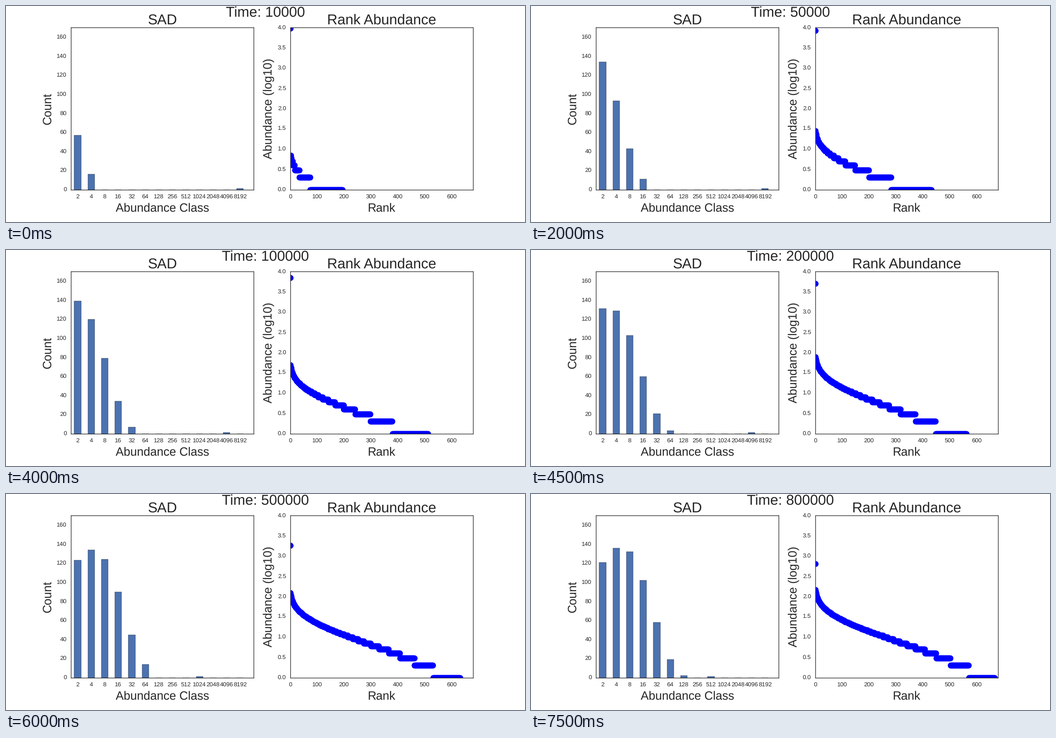
Animation of 1159 by 483 pixels, one loop 8000 ms. Source, as a matplotlib script:

```python
import numpy as np
import matplotlib.pyplot as plt
from matplotlib.animation import FuncAnimation

W, H, DPI = 1159, 483, 96
INK = "#262626"
plt.rcParams["font.family"] = "Liberation Sans"
plt.rcParams["text.hinting"] = "none"

# Time in units of 10000 steps
TIMES = [1, 2, 3, 4, 5, 6, 7, 9, *range(10, 81, 10)]
CLASSES = 2 ** np.arange(1, 14)

KEY_TIMES = [1, 3, 10, 30, 80]
RICHNESS = [195, 372, 513, 593, 668]
STEEPNESS = [1.87, 1.07, 0.58, 0.375, 0.303]
SHAPE = 0.6


def over_log_time(t, values):
    return np.interp(np.log(t), np.log(KEY_TIMES), values)


def abundances(t):
    """Species sizes, largest first: a stretched exponential below one dominant species.

    The number of species with at least a members is
    richness * exp(-steepness * (a ** SHAPE - 1)).
    """
    richness = round(over_log_time(t, RICHNESS))
    steepness = np.exp(over_log_time(t, np.log(STEEPNESS)))
    rank = np.arange(2, richness + 1)
    sizes = (1 + np.log(richness / rank) / steepness) ** (1 / SHAPE)
    dominant = 10 ** (4 - 0.0148 * t)
    return np.floor(np.append(dominant, sizes))


fig, (sad, ranks) = plt.subplots(1, 2, figsize=(W / DPI, H / DPI), dpi=DPI, facecolor="white")
fig.subplots_adjust(left=0.125, right=0.9, bottom=0.15, top=0.9, wspace=0.2)


def label(x, y, text, size, rotation=0):
    return fig.text(x / W, 1 - y / H, text, size=size, color=INK, ha="center",
                    va="baseline", rotation=rotation, rotation_mode="anchor")


sad.set(xlim=(-0.5, 13), ylim=(0, 170), yticks=range(0, 161, 20))
sad.set_xticks(range(len(CLASSES)), CLASSES)
ranks.set(xlim=(0, 680), ylim=(0, 4), xticks=range(0, 601, 100))
ranks.set_yticks(np.arange(0, 4.1, 0.5))

for ax in (sad, ranks):
    ax.tick_params(length=0, pad=7, labelsize=10, labelcolor=INK)
    ax.tick_params(axis="x", pad=7.7)
    plt.setp(ax.get_yticklabels(), va="center")
    for spine in ax.spines.values():
        spine.set(linewidth=1, edgecolor=INK)

label(349, 41, "SAD", 24)
label(839, 41, "Rank Abundance", 24)
label(349, 460, "Abundance Class", 20)
label(838.5, 460, "Rank", 20)
label(101, 229.5, "Count", 20, 90)
label(594, 229.5, "Abundance (log10)", 20, 90)
clock = label(579.5, 24, "", 24)

bars = sad.bar(range(len(CLASSES)), np.zeros(len(CLASSES)), width=0.5,
               color="#4c72b0", edgecolor="black", linewidth=0.3)
dots, = ranks.plot([], [], "o", color="blue", markersize=10, markeredgewidth=0)


def draw(i):
    sizes = abundances(TIMES[i])
    heights, _ = np.histogram(sizes, bins=np.append(CLASSES, 2 * CLASSES[-1]))
    for bar, height in zip(bars, heights):
        bar.set_height(height)
    dots.set_data(np.arange(len(sizes)), np.log10(sizes))
    clock.set_text(f"Time: {TIMES[i] * 10000}")
    return [clock, dots, *bars]


anim = FuncAnimation(fig, draw, frames=len(TIMES), interval=500, repeat=True, repeat_delay=0)
plt.show()
```
